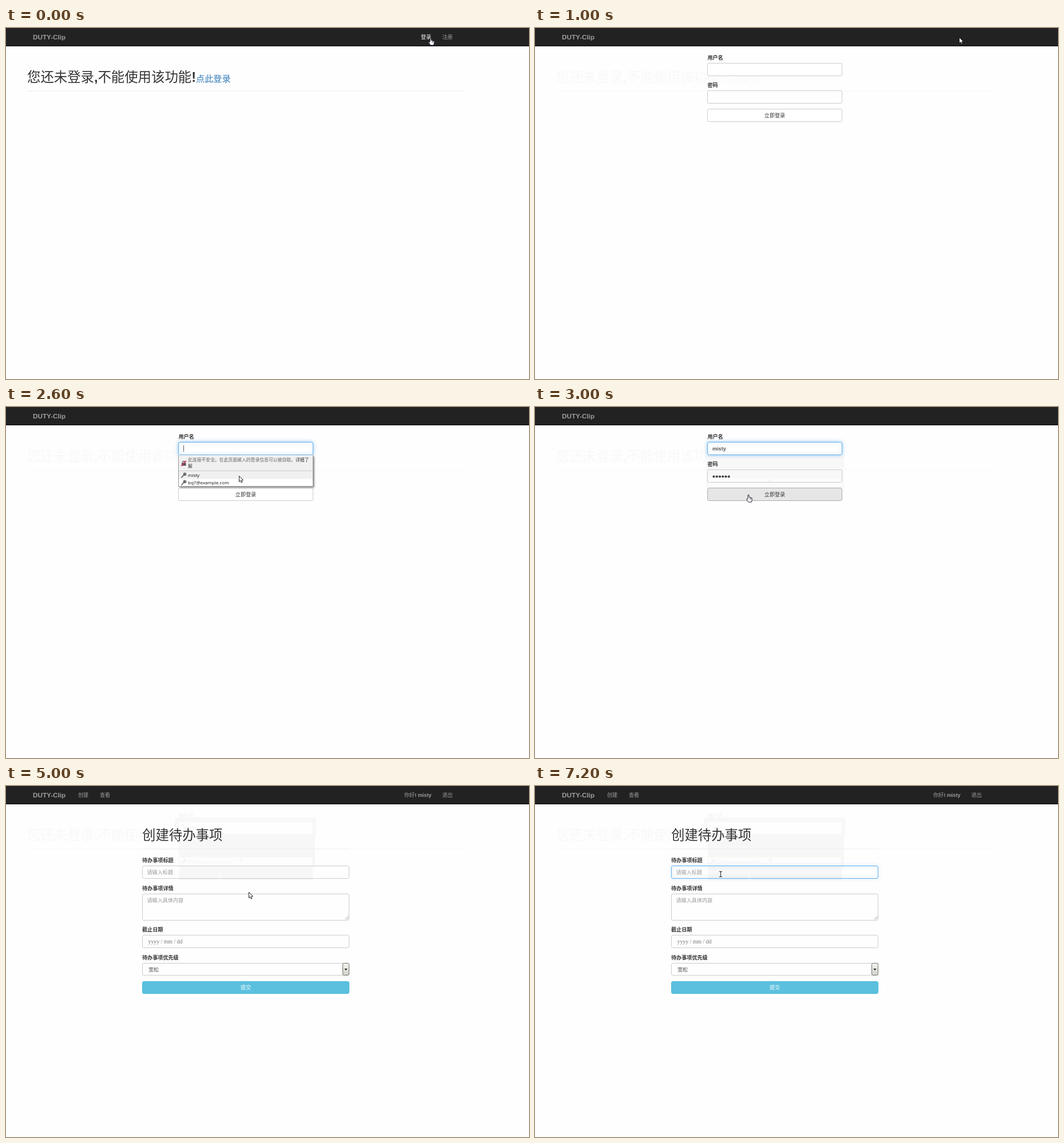
Animation, 914 px wide and 613 px high, one loop 8000 ms. Source, as an HTML page with a canvas:

```html
<!DOCTYPE html>
<html lang="zh-CN">
<head>
<meta charset="utf-8">
<title>待办事项</title>
<style>
html, body { margin: 0; width: 100%; height: 100%; overflow: hidden; background: #fefefe; }
canvas { display: block; width: 914px; height: 613px; }
</style>
</head>
<body>
<canvas id="stage"></canvas>
<script>
const W = 914, H = 613, LOOP = 8000;
const BRAND = 'DUTY-Clip', USER = 'misty', MAIL = 'bq7@example.com';
const BG = '#fefefe', GHOST = '#f8f8f8', DARK = '#333', NAV = '#9d9d9d';
const CJK = '"Noto Sans CJK SC", "Noto Sans CJK", sans-serif';
const LATIN = '"Liberation Sans", Arial, sans-serif';
const UI = '"Open Sans", sans-serif';
const SMALL = 9.1, TITLE = 23.4;

const canvas = document.getElementById('stage');
const dpr = window.devicePixelRatio || 1;
canvas.width = W * dpr;
canvas.height = H * dpr;
const c = canvas.getContext('2d');
c.scale(dpr, dpr);

function fill(x, y, w, h, color) {
  c.fillStyle = color;
  c.fillRect(x, y, w, h);
}

function write(str, x, cy, size, color, font, weight = 400) {
  c.font = `${weight} ${size}px ${font}`;
  c.fillStyle = color;
  c.fillText(str, x, cy + size * 0.37);
  return x + c.measureText(str).width;
}

// Latin runs are always bold, Chinese runs take the given weight
function text(str, x, cy, size = SMALL, color = DARK, weight = 400) {
  for (const run of str.match(/[\x20-\x7e]+|[^\x20-\x7e]+/g)) {
    const latin = run.charCodeAt(0) < 127;
    x = write(run, x, cy, size, color, latin ? LATIN : CJK, latin ? 700 : weight);
  }
  return x;
}

const label = (str, x, cy) => text(str, x, cy, SMALL, DARK, 700);

function centered(str, x, cy, color) {
  text(str, x - str.length * SMALL / 2, cy, SMALL, color);
}

function box(x, y, w, h, { bg, border = '#ccc', glow = false } = {}) {
  c.beginPath();
  c.roundRect(x + 0.5, y + 0.5, w - 1, h - 1, 2.4);
  c.save();
  if (glow) {
    c.shadowColor = 'rgba(102,175,233,.65)';
    c.shadowBlur = 6 * dpr;
    border = '#66afe9';
  }
  if (bg) {
    c.fillStyle = bg;
    c.fill();
  }
  c.strokeStyle = border;
  c.lineWidth = 1;
  c.stroke();
  c.restore();
}

function poly(points, color, outline) {
  c.beginPath();
  points.forEach(([x, y]) => c.lineTo(x, y));
  c.closePath();
  c.fillStyle = color;
  c.fill();
  if (outline) {
    c.strokeStyle = outline;
    c.lineWidth = 1;
    c.lineJoin = 'round';
    c.stroke();
  }
}

function at(x, y, draw) {
  c.save();
  c.translate(x, y);
  draw();
  c.restore();
}

function arrow(x, y) {
  at(x, y, () => poly([[0.5, 0.5], [0.5, 10.5], [2.8, 8.5], [4.3, 12],
    [6, 11.2], [4.6, 7.9], [7.5, 7.6]], '#fff', '#222'));
}

function hand(x, y) {
  at(x, y, () => {
    c.beginPath();
    c.moveTo(3, 8.5);
    c.lineTo(3, 1.5);
    c.quadraticCurveTo(4, 0, 5, 1.5);
    c.lineTo(5, 5);
    c.lineTo(9, 6);
    c.quadraticCurveTo(10.6, 6.3, 10.5, 8);
    c.lineTo(9.5, 13.5);
    c.lineTo(4, 13.5);
    c.lineTo(0.6, 8.8);
    c.quadraticCurveTo(0.8, 7, 3, 8.5);
    c.closePath();
    c.fillStyle = '#fff';
    c.fill();
    c.strokeStyle = '#223';
    c.lineWidth = 1;
    c.stroke();
    fill(6.5, 6, 0.7, 3, '#223');
    fill(8.3, 6.5, 0.7, 2.5, '#223');
  });
}

function beam(x, y) {
  fill(x, y, 1, 10, '#222');
  fill(x - 2, y, 5, 1, '#222');
  fill(x - 2, y + 9, 5, 1, '#222');
}

function keyIcon(x, y, color = '#666') {
  at(x, y, () => {
    c.strokeStyle = color;
    c.lineCap = 'round';
    c.lineWidth = 1.8;
    c.beginPath();
    c.moveTo(1, -1);
    c.lineTo(-3.6, 3.8);
    c.stroke();
    c.beginPath();
    c.arc(2, -1.8, 2.8, 0, 7);
    c.fillStyle = color;
    c.fill();
    fill(2.4, -3.2, 1.1, 1.1, '#eee');
  });
}

function lockIcon(x, y) {
  at(x, y, () => {
    c.strokeStyle = '#555';
    c.lineWidth = 1.4;
    c.beginPath();
    c.arc(0.3, -1.5, 2.4, Math.PI, 0);
    c.stroke();
    fill(-3.5, -1, 7.5, 5, '#555');
    c.lineWidth = 1.6;
    c.strokeStyle = '#d7264c';
    c.beginPath();
    c.moveTo(-4.2, 4.5);
    c.lineTo(4.4, -4.5);
    c.stroke();
  });
}

function navbar() {
  fill(0, 0, W, 32, '#222');
  fill(0, 31, W, 1, '#0b0508');
  text(BRAND, 47, 15.5, 11.7, NAV);
}

function notice(main, link, rule) {
  const end = text('您还未登录,不能使用该功能!', 37, 85.5, TITLE, main);
  text('点此登录', end, 88, 15.2, link);
  fill(37, 109.5, 763, 1, rule);
}

const faintNotice = () => notice(GHOST, GHOST, '#fafafa');

function loginForm({ user = '', filled = false, focus = false, hover = false } = {}) {
  label('用户名', 301.5, 51.5);
  box(301, 61, 236, 23, { bg: '#fff', glow: focus });
  if (user) text(user, 310, 72.5, SMALL, '#555');
  label('密码', 301.5, 100);
  box(301, 109, 236, 23, { bg: filled ? '#f8f8f8' : BG });
  if (filled) {
    fill(303, 125, 232, 6, '#fcfcfc');
    for (let i = 0; i < 6; i++) {
      c.beginPath();
      c.arc(312.5 + i * 5.25, 121.5, 2.1, 0, 7);
      c.fillStyle = '#444';
      c.fill();
    }
  }
  box(301, 141, 236, 23, hover ? { bg: '#e6e6e6', border: '#adadad' } : { bg: '#fff' });
  centered('立即登录', 419, 153, DARK);
}

function suggestions() {
  c.save();
  c.shadowColor = 'rgba(0,0,0,.55)';
  c.shadowBlur = 3 * dpr;
  c.shadowOffsetX = c.shadowOffsetY = 1.5 * dpr;
  fill(301, 84, 236, 55, '#999');
  c.restore();
  fill(302, 84, 234, 54, '#fff');
  fill(302, 84, 234, 41.5, '#f0f0f0');
  fill(302, 111, 234, 1, '#ccc');
  lockIcon(310.5, 98.5);
  const end = write('此连接不安全。在此页面输入的登录信息可以被窃取。', 318, 92.5, 7.83, '#666', CJK);
  write('详细了', end, 92.5, 7.83, DARK, CJK, 500);
  write('解', 318, 103.5, 7.83, DARK, CJK, 500);
  keyIcon(310.5, 119);
  keyIcon(310.5, 132);
  write(USER, 318, 119, 8, '#111', UI);
  write(MAIL, 318, 132, 8, '#111', UI);
}

// Faint remains of the login page
function loginGhost() {
  text('用户名', 301.5, 51.5, SMALL, '#f5f5f5', 700);
  c.beginPath();
  c.roundRect(295, 55, 247.5, 34, 5);
  c.fillStyle = GHOST;
  c.fill();
  fill(302, 84, 238, 58, '#f7f7f7');
  fill(302, 140, 234.5, 24, '#f7f7f7');
  fill(303, 63, 232, 20, BG);
  fill(303, 125, 232, 14, '#fdfdfd');
  text(USER, 310, 72.5, SMALL, '#f4f4f4');
  keyIcon(310.5, 132, '#f4f4f4');
  write(MAIL, 318, 132, 8, '#f4f4f4', UI);
  poly([[407, 131], [413, 124], [414, 131]], '#f5f5f5');
  poly([[372, 154], [375, 154], [379, 164], [372, 164]], '#fbfbfb');
}

function select(x, y, w, h) {
  box(x, y, w, h);
  text('宽松', 249, 320.5, SMALL, '#555');
  const shade = c.createLinearGradient(0, y, 0, y + h);
  shade.addColorStop(0, '#f4f4f0');
  shade.addColorStop(1, '#cfcfca');
  box(588, y, 12, h, { bg: shade, border: '#77776d' });
  poly([[591.5, 319], [596.5, 319], [594, 322]], '#111');
}

function createPage(focus) {
  c.save();
  c.beginPath();
  c.rect(0, 32, 237, 90);
  c.rect(600, 32, 210, 90);
  c.clip();
  faintNotice();
  c.restore();
  loginGhost();
  navbar();
  [['创建', 126], ['查看', 164], ['你好! ' + USER, 696], ['退出', 762.5]]
    .forEach(([str, x]) => text(str, x, 15.5, SMALL, NAV));

  text('创建待办事项', 238, 85.5, TITLE);
  fill(238, 109.5, 362, 1, '#eee');
  label('待办事项标题', 238, 130);
  box(238, 139, 362, 23, { glow: focus });
  text('请输入标题', 246.5, 151, SMALL, '#999');
  label('待办事项详情', 238, 178.5);
  box(238, 188, 362, 47, { bg: BG });
  text('请输入具体内容', 246.5, 199.5, SMALL, '#999');
  c.strokeStyle = '#aaa';
  c.lineWidth = 0.8;
  for (const d of [2, 4, 6]) {
    c.beginPath();
    c.moveTo(598.5 - d, 233);
    c.lineTo(598.5, 233 - d);
    c.stroke();
  }
  label('截止日期', 238, 251);
  box(238, 260, 362, 23);
  write('yyyy / mm / dd', 248.5, 271, 9.8, '#777', '"Liberation Serif", serif');
  label('待办事项优先级', 238, 299.5);
  select(238, 309, 362, 22);
  box(238, 341, 362, 22, { bg: '#5bc0de', border: '#46b8da' });
  centered('提交', 419, 352, '#fff');
}

const scenes = [
  [0, () => {
    navbar();
    text('登录', 725, 15.5, SMALL, '#fff', 500);
    text('注册', 762.5, 15.5, SMALL, NAV);
    notice(DARK, '#337ab7', '#eee');
    hand(738, 16.5);
  }],
  [1000, () => {
    navbar();
    faintNotice();
    loginForm();
    arrow(741, 16);
  }],
  [2000, () => {
    navbar();
    faintNotice();
    loginForm({ focus: true });
    fill(310, 67, 1, 11, '#555');
    suggestions();
    arrow(407, 120);
  }],
  [3000, () => {
    navbar();
    faintNotice();
    fill(299, 84, 241, 57, GHOST);
    fill(303, 125, 235, 13, '#fcfcfc');
    loginForm({ user: USER, filled: true, focus: true, hover: true });
    poly([[407, 131], [413, 124], [414, 131]], '#f5f5f5');
    hand(369, 152.5);
  }],
  [4000, () => {
    fill(0, 0, W, 32, GHOST);
    faintNotice();
    loginGhost();
    arrow(423, 185);
  }],
  [5000, () => {
    createPage(false);
    arrow(424, 185);
  }],
  [6000, () => {
    createPage(true);
    beam(324, 149);
  }]
];

const start = performance.now();

function frame() {
  const t = (performance.now() - start) % LOOP;
  fill(0, 0, W, H, BG);
  scenes.findLast(([from]) => t >= from)[1]();
  requestAnimationFrame(frame);
}
frame();
</script>
</body>
</html>
```
